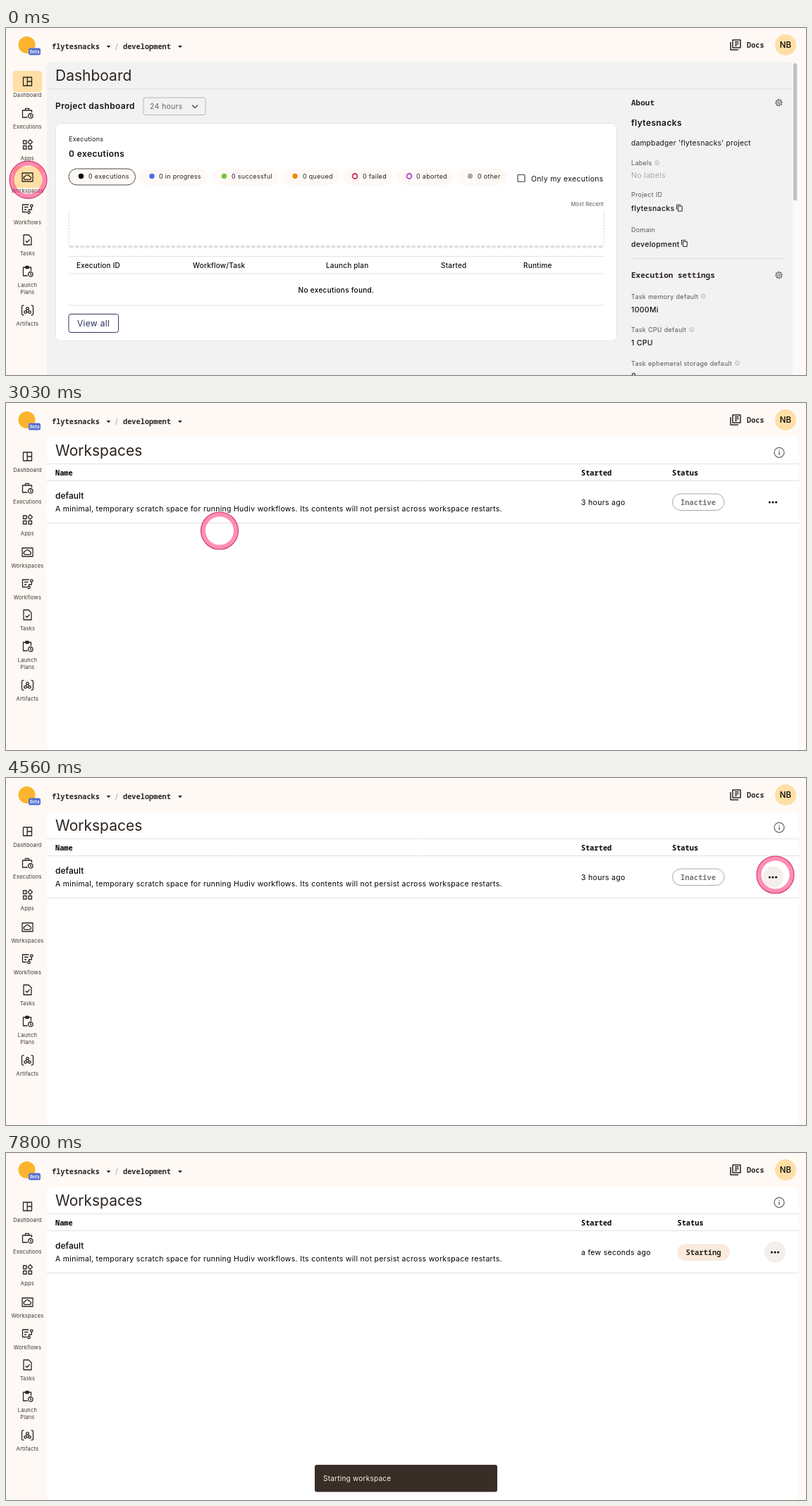
Recreate the animation shown at these times as an HTML page with a canvas. Size 1135 by 493 pixels, loop 8670 ms.

```html
<!DOCTYPE html>
<html lang="en">
<head>
<meta charset="utf-8">
<title>Workspaces</title>
<style>
  html, body { margin: 0; width: 100%; height: 100%; overflow: hidden; background: #fef9f5; }
  canvas { display: block; width: 1135px; height: 493px; }
</style>
</head>
<body>
<canvas id="stage"></canvas>
<script>
const W = 1135, H = 493, LOOP = 8670, TICK = 30;
const INK = '#2b2420', CREAM = '#fef9f5', AMBER = '#ffdfa6', LINE = '#e2e2e2';
const SANS = 'Inter, sans-serif', MONO = '"Noto Sans Mono", "DejaVu Sans Mono", monospace';
const canvas = document.getElementById('stage');
const ctx = canvas.getContext('2d');
const dpr = window.devicePixelRatio || 1;
canvas.width = W * dpr;
canvas.height = H * dpr;

// ---------- helpers ----------
const clamp = v => Math.max(0, Math.min(1, v));
const ramp = (t, start, length) => clamp((t - start) / length);

function bezier(x1, y1, x2, y2) {
  const at = (a, b, s) => 3 * (1 - s) * (1 - s) * s * a + 3 * (1 - s) * s * s * b + s * s * s;
  return x => {
    let lo = 0, hi = 1;
    for (let i = 0; i < 24; i++) {
      const mid = (lo + hi) / 2;
      if (at(x1, x2, mid) < x) lo = mid; else hi = mid;
    }
    return at(y1, y2, (lo + hi) / 2);
  };
}
const easeInOut = bezier(.4, 0, .2, 1), easeOut = bezier(0, 0, .2, 1);

// y is the middle of the capitals
function text(str, x, y, size, { w = 400, c = '#000', ls = .3, font = SANS, align = 'left' } = {}) {
  ctx.font = `${w} ${size}px ${font}`;
  ctx.letterSpacing = ls + 'px';
  ctx.textAlign = align;
  ctx.fillStyle = c;
  ctx.fillText(str, x, y + size * .36);
}
const mono = (str, x, y, size = 10.3, c = INK) => text(str, x, y, size, { w: 700, c, ls: 0, font: MONO });

function box(x, y, w, h, r, fill, stroke, lw = 1) {
  ctx.beginPath();
  ctx.roundRect(x, y, w, h, r);
  if (fill) { ctx.fillStyle = fill; ctx.fill(); }
  if (stroke) { ctx.strokeStyle = stroke; ctx.lineWidth = lw; ctx.stroke(); }
}
function disc(x, y, r, fill, stroke, lw = 1) {
  box(x - r, y - r, 2 * r, 2 * r, r, fill, stroke, lw);
}
function line(x1, y1, x2, y2, c = LINE, dash = []) {
  ctx.setLineDash(dash);
  ctx.beginPath();
  ctx.moveTo(x1, y1);
  ctx.lineTo(x2, y2);
  ctx.strokeStyle = c;
  ctx.lineWidth = 1;
  ctx.stroke();
  ctx.setLineDash([]);
}
function icon(d, x, y, lw = 1.3, c = INK) {
  ctx.save();
  ctx.translate(x, y);
  ctx.lineWidth = lw;
  ctx.strokeStyle = c;
  ctx.lineJoin = 'round';
  ctx.stroke(new Path2D(d));
  ctx.restore();
}
const ring = (x, y, r) => `M${x - r} ${y}a${r} ${r} 0 1 0 ${2 * r} 0a${r} ${r} 0 1 0 ${-2 * r} 0`;
const clock = ring(4.3, 3.8, 3.3) + 'M4.3 2V4L5.6 5';

const ICONS = {
  grid: 'M-6-6H6V6H-6ZM-.3-6V6M-.3 0H6',
  briefcase: 'M0 6H-7V-4H6V-1M-3-4V-6.7H2V-4' + clock,
  apps: 'M-6-6H-1.5V-1.5H-6ZM-6 1.5H-1.5V6H-6ZM1.5 1.5H6V6H1.5ZM3.8-7.2L7-3.9 3.8-.7 .5-3.9Z',
  cloud: 'M-7.5-6H7.5V6H-7.5ZM-3 3.3a2.2 2.2 0 0 1-.3-4.4a3.2 3.2 0 0 1 6-.3a2.4 2.4 0 0 1 .5 4.7Z',
  flow: 'M2-6H-7V4.5H-1M-4.5-2.5H1M-4.5 1H-1.5M5.8-2.8V1H2V3.3' + ring(5.8, -4.5, 1.7) + ring(2, 5, 1.7),
  file: 'M-5.5-7H1.5L5.5-3V7H-5.5ZM-2.7 1.5L-.7 3.5 3-.5',
  clipboard: 'M0 6H-6V-6H5V-1M-2.5-6V-7.5H1.5V-4.5H-2.5Z' + clock,
  cluster: 'M-5-6.8H-6.5Q-8-6.8-8-5V5Q-8 6.8-6.5 6.8H-5M5-6.8H6.5Q8-6.8 8-5V5Q8 6.8 6.5 6.8H5'
    + 'M-1-1L-2.2 1M1-1L2.2 1M-1 2.6H1' + ring(0, -2.6, 1.8) + ring(-2.9, 2.6, 1.8) + ring(2.9, 2.6, 1.8),
  books: 'M-4-7H7V4H-4ZM-7-4V7H4M-1-4.2H4.5M-1-1.6H4.5M-1 1H2',
  copy: 'M-2-2.8H3.8V4.2H-2ZM-4 2V-4.8H2',
  chevron: 'M-4-2L0 2 4-2'
};

function info(x, y, r, c) {
  disc(x, y, r, null, c, r > 4 ? 1.3 : .7);
  const k = r / 7;
  icon(`M0 ${-k}V${3.6 * k}M0 ${-3.6 * k}V${-2.2 * k}`, x, y, r > 4 ? 1.4 : .7, c);
}
function gear(x, y) {
  icon(ring(0, 0, 3.8) + ring(0, 0, 1.6), x, y, 1, '#555');
  ctx.setLineDash([1.7, 1.8]);
  icon(ring(0, 0, 4.6), x, y, 1.2, '#555');
  ctx.setLineDash([]);
}
function caret(x, y) {
  ctx.fillStyle = INK;
  ctx.fill(new Path2D(`M${x - 3} ${y - 1.5}h6l-3 3.2z`));
}

// ---------- chrome ----------
const NAV = [
  ['grid', 76, 'Dashboard'], ['briefcase', 121, 'Executions'], ['apps', 166, 'Apps'],
  ['cloud', 212, 'Workspaces'], ['flow', 257, 'Workflows'], ['file', 301, 'Tasks'],
  ['clipboard', 346, 'Launch', 'Plans'], ['cluster', 401, 'Artifacts']
];

function chrome(t) {
  ctx.fillStyle = CREAM;
  ctx.fillRect(0, 0, W, H);
  disc(29.5, 24, 12, '#fbb42c');
  box(32, 28.5, 17, 10, 2.5, '#5470cf');
  text('Beta', 40.7, 33.6, 6.2, { w: 600, c: '#fff', ls: 0, align: 'center' });
  mono('flytesnacks', 65, 26.5);
  caret(145.5, 26.5);
  text('/', 155, 26, 10.5, { c: '#999' });
  mono('development', 166, 26.5);
  caret(247, 26.5);
  icon(ICONS.books, 1035, 24, 1.5);
  mono('Docs', 1051, 24.5);
  disc(1106, 24, 15, AMBER);
  text('NB', 1106, 24.2, 11.5, { w: 500, ls: 0, align: 'center' });

  if (t < 1770) box(10, 61, 41, 30, 4, AMBER);
  if (t < 2790) box(10, 197, 41, 30, 4, AMBER);
  for (const [name, y, ...labels] of NAV) {
    icon(ICONS[name], 30.5, y);
    labels.forEach((s, i) => {
      text(s, 30.4, y + 19.2 + i * 10, 7.5, { c: '#3d3530', ls: .2, align: 'center' });
    });
  }
}

// ---------- dashboard ----------
const PILLS = [
  [89, 94.5, '0 executions', 106.5, 117, '#000'], [189, 97, '0 in progress', 207, 217, '#4a6fe8'],
  [292, 94, '0 successful', 309.5, 320, '#79c232'], [392, 80, '0 queued', 410, 421, '#ec8a10'],
  [478, 70, '0 failed', 495, 506, '#c0254d', 1], [554, 81, '0 aborted', 572, 582, '#b53fca', 1],
  [641, 70, '0 other', 658.5, 669, '#a9a9a9']
];
const HEADS = [[100, 'Execution ID'], [265, 'Workflow/Task'], [454, 'Launch plan'], [617, 'Started'], [734, 'Runtime']];

function dashboard() {
  ctx.fillStyle = '#fafafa';
  ctx.fillRect(1116, 48, 8, H);
  box(58, 48, 1058, 460, [8, 0, 0, 0], '#f2f2f2');
  box(1117, 50, 5.2, 195, 2.6, '#c1c1c1');
  text('Dashboard', 70, 67.5, 21, { c: INK, ls: 0 });
  line(58, 86.5, 1116, 86.5, '#dedede');
  text('Project dashboard', 70, 111, 12, { w: 600, c: '#111', ls: .4 });
  box(195, 99, 88, 24.5, 2, null, '#b8b8b8');
  text('24 hours', 204, 111.5, 10.5, { c: '#666' });
  icon(ICONS.chevron, 268, 111.5, 1.5, '#555');

  box(70.5, 135.5, 795.5, 309, 6, '#fff', '#e6e6e6');
  text('Executions', 89, 157.5, 9, { c: '#111' });
  text('0 executions', 89, 179, 12, { w: 600, c: '#111', ls: .4 });
  PILLS.forEach(([x, w, label, dx, tx, c, hollow], i) => {
    box(x, 200, w, 23, 11.5, CREAM, i ? null : '#4a4a4a');
    if (hollow) disc(dx, 210.5, 3.5, '#fff', c, 1.8);
    else disc(dx, 210.5, 3.7, c);
    text(label, tx, 211, 9, { c: '#222' });
  });
  box(726, 208.5, 10, 10, 1, null, '#444', 1.2);
  text('Only my executions', 745, 214, 10.5, { c: '#111' });
  text('Most Recent', 848, 250, 7.5, { c: '#555', ls: .2, align: 'right' });
  line(89, 260, 89, 312, '#ccc', [2, 2]);
  line(848, 260, 848, 312, '#ccc', [2, 2]);
  for (let i = 0; i < 100; i++) box(90 + i * 7.58, 308.5, 6.2, 4.2, 2, '#e2e2e2');
  for (const y of [324.5, 349, 394]) line(89, y, 848, y);
  for (const [x, s] of HEADS) text(s, x, 337.5, 10, { w: 500, c: '#111', ls: .2 });
  text('No executions found.', 468.5, 372, 10, { w: 500, align: 'center' });
  box(89, 406.5, 70.5, 26, 3, '#fff', '#33345e');
  text('View all', 101, 419.5, 12, { c: '#2c2d66' });
  about();
}

function about() {
  const x = 887;
  const label = (s, y, ix) => {
    text(s, x, y, 9, { c: '#555' });
    if (ix) info(ix, y - .5, 2.9, '#999');
  };
  const value = (s, y) => text(s, x, y, 10.5, { w: 500, c: '#111' });
  mono('About', x, 106, 11);
  gear(1096.5, 106);
  text('flytesnacks', x, 135, 12, { w: 600, c: '#111', ls: .4 });
  text("dampbadger 'flytesnacks' project", x, 163, 10.2, { c: '#111', ls: .24 });
  label('Labels', 192, 923.5);
  text('No labels', x, 209, 10.5, { c: '#aaa' });
  label('Project ID', 236.5);
  value('flytesnacks', 256.5);
  icon(ICONS.copy, 955.5, 256, 1);
  label('Domain', 286.5);
  value('development', 307);
  icon(ICONS.copy, 962.5, 306.3, 1);
  line(x, 327.5, 1106, 327.5, '#dcdcdc');
  mono('Execution settings', x, 351, 11);
  gear(1096.5, 351);
  label('Task memory default', 381.5, 989);
  value('1000Mi', 400);
  label('Task CPU default', 429, 972.5);
  value('1 CPU', 447.5);
  label('Task ephemeral storage default', 476.5, 1037.5);
  value('0', 494.5);
}

// ---------- workspaces ----------
function buttonGlow(t) {
  if (t < 4900) return ramp(t, 4170, 180) * (1 - ramp(t, 4650, 200));
  return .55 * ramp(t, 6390, 120) + .45 * ramp(t, 6990, 240);
}

function workspaces(t) {
  box(58, 48, 1067, 446, 8, '#fff');
  text('Workspaces', 70, 67.5, 21, { c: INK, ls: 0 });
  line(58, 86.5, 1125, 86.5);
  info(1097, 70.3, 7, '#666');
  if (t < 1890) return;

  const started = t >= 7050;
  const sx = started ? 952.5 : 945, bx = started ? 1091 : 1088;
  mono('Name', 70, 99.5, 10.3, '#000');
  mono('Started', 816, 99.5, 10.3, '#000');
  mono('Status', sx, 99.5, 10.3, '#000');
  line(58, 110.5, 1125, 110.5);
  text('default', 70, 132, 12, { w: 500, ls: .05 });
  text('A minimal, temporary scratch space for running Hudiv workflows. Its contents will not persist across workspace restarts.', 70, 149.8, 10.5);
  text(started ? 'a few seconds ago' : '3 hours ago', 816, 141, 10.5);
  if (started) box(sx, 129, 74.5, 24, 12, '#f9eadd');
  else box(sx + .5, 129, 73.5, 23.5, 11.75, '#fff', '#a9a9a9');
  mono(started ? 'Starting' : 'Inactive', sx + 12, 141.2, 10.4, started ? INK : '#757575');
  line(58, 170.5, 1125, 170.5);

  ctx.globalAlpha = buttonGlow(t);
  disc(bx, 140.8, 15, '#f4efea');
  ctx.globalAlpha = 1;
  for (const d of [-4.6, 0, 4.6]) disc(bx + d, 141, 1.5, '#000');
  menu(t);
  toast(t);
}

function menu(t) {
  const open = 4650, close = 6370, fade = 197, grow = 131;
  if (t < open || t > close + fade) return;
  const closing = t >= close;
  const alpha = closing ? 1 - easeInOut(ramp(t, close, fade)) : easeInOut(ramp(t, open, fade));
  const size = closing ? 1 - easeInOut(ramp(t, close + 66, grow)) : easeInOut(ramp(t, open, grow));
  ctx.save();
  ctx.globalAlpha = alpha;
  ctx.translate(1062, 156);
  ctx.scale(.75 + .25 * size, .5625 + .4375 * size);
  ctx.translate(-1062, -156);
  // wide soft shadow, then a tight one
  for (const [dy, blur, a] of [[5, 10, .26], [3, 4, .3]]) {
    ctx.shadowColor = `rgba(0,0,0,${a})`;
    ctx.shadowBlur = blur * dpr;
    ctx.shadowOffsetY = dy * dpr;
    box(1001, 156, 122, 41, 2, '#f8ebdf');
  }
  ctx.shadowColor = 'transparent';
  text('Start Workspace', 1013, 177, 12, { c: INK, ls: .23 });
  ctx.restore();
}

function toast(t) {
  if (t < 6409) return;
  const y = 443 + 50 * (1 - easeOut(ramp(t, 6409, 225)));
  box(438, y, 259, 38.5, 3, '#382d27');
  text('Starting workspace', 450, y + 19.3, 10, { c: '#fef3ea', ls: .25 });
}

// ---------- pointer ----------
const PATH = [
  [2760, 30.8, 216.5], [3030, 303, 181.5], [3630, 945, 107], [3750, 1030.5, 101.5],
  [3840, 1064, 100.3], [4050, 1084, 114], [4470, 1091.5, 137.5], [5250, 1091.5, 137.5],
  [5550, 1082, 159], [6000, 1062, 175.7]
];

// monotone cubic through the path points
function along(t, k) {
  const n = PATH.length - 1;
  if (t >= PATH[n][0]) return PATH[n][k];
  let i = 0;
  while (t >= PATH[i + 1][0]) i++;
  const slope = j => (PATH[j + 1][k] - PATH[j][k]) / (PATH[j + 1][0] - PATH[j][0]);
  const tangent = j => {
    if (j === 0 || j === n) return 0;
    const a = slope(j - 1), b = slope(j);
    return a * b <= 0 ? 0 : 2 * a * b / (a + b);
  };
  const h = PATH[i + 1][0] - PATH[i][0], s = (t - PATH[i][0]) / h, r = 1 - s;
  return PATH[i][k] * (1 + 2 * s) * r * r + PATH[i + 1][k] * s * s * (3 - 2 * s)
    + h * s * r * (tangent(i) * r - tangent(i + 1) * s);
}

function pointer(t) {
  if (t >= 7800) return;
  let x, y;
  if (t < 240) [x, y] = [31.5, 215.6];
  else if (t < 1290) [x, y] = [31.2, 216];
  else if (t < 2760) [x, y] = [30.8, 216.5];
  else [x, y] = [along(t, 1), along(t, 2)];
  disc(x, y, 23.3, null, 'rgba(252,52,120,.55)', 6.6);
  disc(x, y, 26.5, null, 'rgba(208,36,104,.9)', 1.1);
}

function draw(now) {
  const t = Math.floor((now % LOOP) / TICK) * TICK;
  ctx.setTransform(dpr, 0, 0, dpr, 0, 0);
  chrome(t);
  if (t < 1770) dashboard();
  else workspaces(t);
  pointer(t);
}

let begin;
function tick(now) {
  begin ??= now;
  draw(Math.max(0, now - begin));
  requestAnimationFrame(tick);
}
requestAnimationFrame(tick);
</script>
</body>
</html>
```
